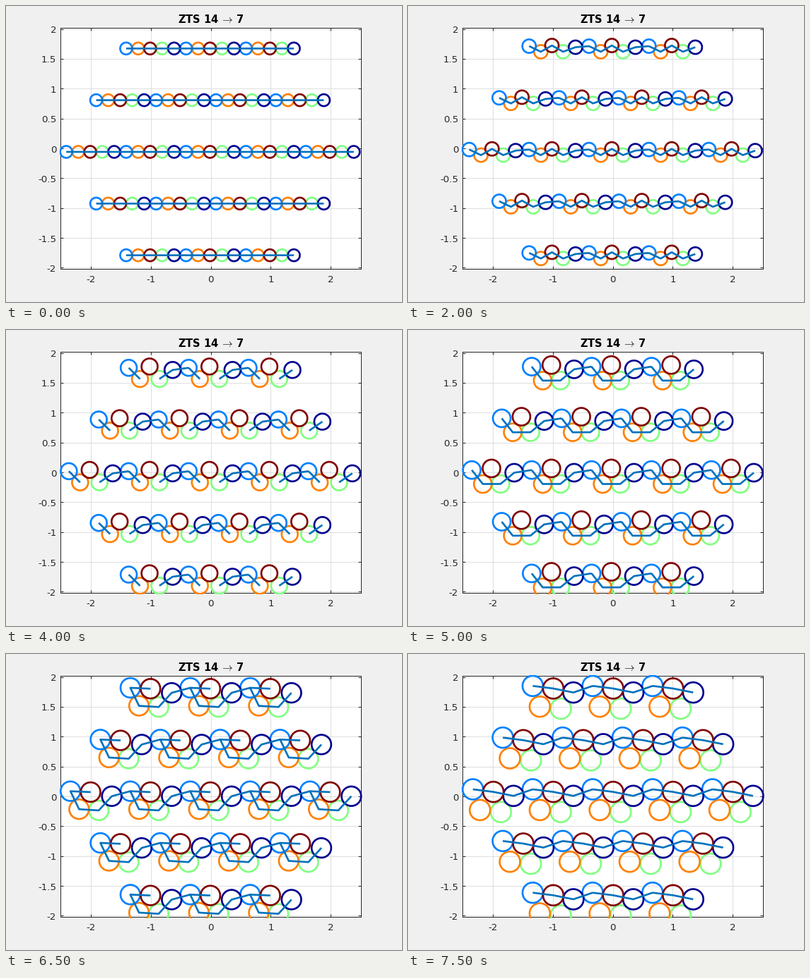
Animation of 560x420 px, one loop 8000 ms. Source, as a matplotlib script:

```python
import numpy as np
import matplotlib.pyplot as plt
from matplotlib.animation import FuncAnimation
from matplotlib.patches import Rectangle

W, H, DPI = 560, 420, 80
PX = 72 / DPI                        # points per pixel
UNIT, CX, CY = 84.7, 290.1, 202.5    # data unit and origin in pixels
LEFT, RIGHT, TOP, BOTTOM = 77, 502, 31, 373
STEPS, INTERVAL, BEND = 16, 500, 10
INK, GRID, LINK = "#262626", "#dedede", "#0072bd"

plt.rcParams["font.family"] = "DejaVu Sans"
plt.rcParams["mathtext.fontset"] = "cm"

COLORS = ["#0080ff", "#ff8000", "#800000", "#80ff80", "#00008f"]
LAYERS = [3, 1, 0, 4, 2]             # drawing order of the discs

# Disc centres within a unit cell: straight chain, jammed trapezoid, end
START = np.array([(0.2 * (i - 2) - 0.019, -0.053) for i in range(5)])
JAM = np.array([(-.36, .045), (-.176, -.189), (-.031, .072),
                (.12, -.188), (.348, 0)])
END = np.array([(-.342, .124), (-.224, -.223), (0, .081),
                (.126, -.257), (.336, .014)])
R_START, R_JAM, R_END = 0.1, 0.148, 0.171

# Contact chains from a step on; 5 is the first disc of the next cell
CONTACTS = [
    (0, [[0, 1, 2, 3, 4, 5]]),
    (5, [[0, 1], [3, 4, 5]]),
    (BEND, [[0, 1, 3, 4, 5]]),
    (13, [[2, 0, 1, 3, 4, 5]]),
    (14, [[0, 2, 4, 5]]),
]

# Hexagonal patch of cells: centre and whether a right neighbour exists
CELLS = [(k - (n - 1) / 2, row * np.sqrt(3) / 2, k < n - 1)
         for row in range(-2, 3)
         for n in [5 - abs(row)]
         for k in range(n)]


def px(x):
    return CX + UNIT * x


def py(y):
    return CY - UNIT * y


fig = plt.figure(figsize=(W / DPI, H / DPI), dpi=DPI, facecolor="#f0f0f0")
ax = fig.add_axes([0, 0, 1, 1])
ax.set(xlim=(0, W), ylim=(H, 0))
ax.axis("off")


def segment(xs, ys, color=INK, z=2):
    ax.plot(np.floor(xs), np.floor(ys), color=color, lw=PX, zorder=z,
            solid_capstyle="butt")


def label(x, y, text, ha):
    ax.text(x, y, text, color=INK, fontsize=13.33 * PX, ha=ha, va="baseline")


def draw_axes():
    ax.add_patch(Rectangle((LEFT, TOP), RIGHT - LEFT, BOTTOM - TOP,
                           fc="white", ec="none", zorder=0))
    for v in range(-2, 3):
        x = px(v)
        segment([x, x], [TOP, BOTTOM], GRID, 1)
        segment([x, x], [BOTTOM, BOTTOM - 4])
        segment([x, x], [TOP, TOP + 4])
        label(x - 0.4, 392, str(v), "center")
    for v in np.arange(-2, 2.1, 0.5):
        y = py(v)
        segment([LEFT, RIGHT], [y, y], GRID, 1)
        segment([LEFT, LEFT + 4], [y, y])
        segment([RIGHT, RIGHT - 4], [y, y])
        label(71.2, y + 5, f"{v:g}", "right")
    segment([LEFT, RIGHT, RIGHT, LEFT, LEFT],
            [TOP, TOP, BOTTOM, BOTTOM, TOP])
    ax.text(289.8, 24, r"ZTS 14 $\!\rightarrow\!$ 7", fontsize=14.67 * PX,
            weight="bold", color="black", ha="center", va="baseline")


draw_axes()

clip = Rectangle((LEFT - 0.8, TOP - 0.8), RIGHT - LEFT + 2.6,
                 BOTTOM - TOP + 2.6, transform=ax.transData)


def clipped_line(color, z):
    line, = ax.plot([], [], color=color, lw=2.67 * PX, zorder=z, snap=False,
                    solid_capstyle="butt", solid_joinstyle="round")
    line.set_clip_path(clip)
    return line


discs = [clipped_line(c, 3 + LAYERS.index(i)) for i, c in enumerate(COLORS)]
links = clipped_line(LINK, 10)

angle = np.append(np.linspace(0, 2 * np.pi, 73), np.nan)
RING = np.column_stack([np.cos(angle), np.sin(angle)])


def pose(step):
    """Disc centres and radius: the chain buckles, then shears once jammed."""
    if step <= BEND:
        p = step / BEND
        ease = p ** 1.4              # height leads, width and radius follow
        return (START + (JAM - START) * [ease, p],
                R_START + (R_JAM - R_START) * ease)
    p = (step - BEND) / (STEPS - 1 - BEND)
    return JAM + (END - JAM) * p, R_JAM + (R_END - R_JAM) * p ** 0.75


def draw_paths(line, paths):
    gap = [(np.nan, np.nan)]
    x, y = np.concatenate([np.vstack([p, gap]) for p in paths]).T
    line.set_data(px(x), py(y))


def update(step):
    pos, r = pose(step)
    for center, disc in zip(pos, discs):
        draw_paths(disc, [(cx, cy) + center + r * RING for cx, cy, _ in CELLS])

    chains = [c for start, c in CONTACTS if start <= step][-1]
    pos = np.vstack([pos, pos[0] + (1, 0)])
    draw_paths(links, [(cx, cy) + pos[[i for i in chain if i < 5 or joined]]
                       for cx, cy, joined in CELLS for chain in chains])
    return [*discs, links]


anim = FuncAnimation(fig, update, frames=STEPS, interval=INTERVAL,
                     repeat=True, repeat_delay=0, blit=False)
plt.show()
```
